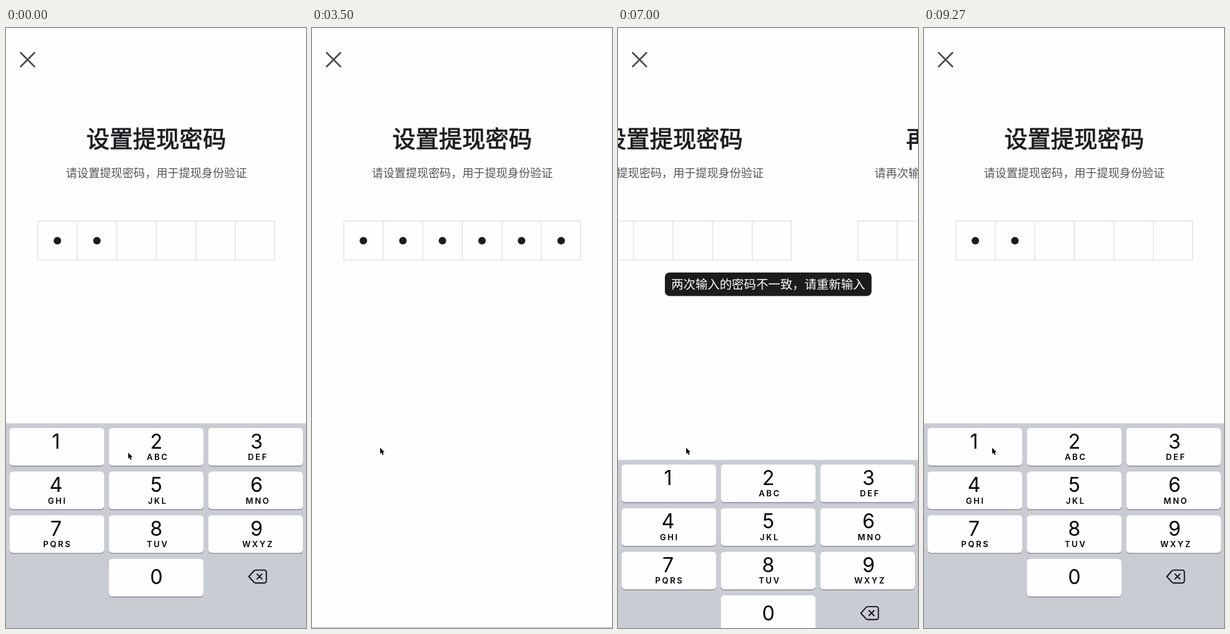
Animation of 480 by 957 pixels, one loop 9310 ms. Source, as an HTML page:

```html
<!DOCTYPE html>
<html lang="zh-CN">
<head>
<meta charset="utf-8">
<style>
html, body { margin: 0; width: 100%; height: 100%; overflow: hidden; background: #fefdff; }
svg { display: block; width: 480px; height: 957px; }
text { text-anchor: middle; font-family: "Noto Sans CJK SC", "Noto Sans CJK", sans-serif; }
.title { font-size: 37.3px; fill: #1d1b1e; stroke: #1d1b1e; stroke-width: .9px; }
.sub { font-size: 18.1px; fill: #555457; }
.digit { font: 32px Inter, sans-serif; }
.abc { font: 600 13px Inter, sans-serif; letter-spacing: 2.6px; }
.toast { font-size: 19.4px; fill: #fefdff; }
.line { fill: none; stroke: #e1e0e3; stroke-width: 1.4; }
.icon { fill: none; stroke: #111; stroke-width: 1.9; stroke-linejoin: round; stroke-linecap: round; }
</style>
</head>
<body>
<svg id="stage" viewBox="0 0 480 957"></svg>
<script>
const LOOP = 9310, GAP = 485;
const stage = document.getElementById('stage');
const $ = id => document.getElementById(id);
const cell = i => 82.2 + i * 63.28;

function page(id, title, sub) {
  let s = `<g id="${id}"><text class="title" x="240.3" y="191.3">${title}</text>
    <text class="sub" x="240.5" y="238.4">${sub}</text>
    <path class="line" d="M51 308H429.7V370.4H51Z`;
  for (let i = 1; i < 6; i++) s += `M${cell(i) - 31.6} 308v62.4`;
  s += '"/>';
  for (let i = 0; i < 6; i++) s += `<circle id="${id}${i}" cx="${cell(i)}" cy="339.2" fill="#1d1b1e"/>`;
  return s + '</g>';
}

function keyboard() {
  const letters = ['', 'ABC', 'DEF', 'GHI', 'JKL', 'MNO', 'PQRS', 'TUV', 'WXYZ'];
  const key = (col, row, digit, abc, dy) => {
    const x = 5.5 + col * 159, y = 638 + row * 69.6, cx = 80 + col * 160.5;
    return `<rect x="${x}" y="${y + 1.4}" width="151.5" height="60" rx="5.5" fill="#898b90"/>
      <rect id="key${digit}" x="${x}" y="${y}" width="151.5" height="60" rx="5.5" fill="#fefdff"/>
      <text class="digit" x="${cx}" y="${y + dy}">${digit}</text>
      <text class="abc" x="${cx + 2.4}" y="${y + 51}">${abc}</text>`;
  };
  return `<g id="keyboard"><rect y="630.5" width="480" height="327" fill="#c9ccd3"/>` +
    letters.map((abc, i) => key(i % 3, Math.floor(i / 3), i + 1, abc, 32.5)).join('') +
    key(1, 3, 0, '', 40) +
    `<path class="icon" d="M388.6 875L396.6 866Q398 864.6 400 864.6H413Q416.6 864.6 416.6 868.2V881.6Q416.6 885.2 413 885.2H400Q398 885.2 396.6 883.8ZM401.6 870.9l8 8m0-8l-8 8"/></g>`;
}

stage.innerHTML =
  page('first', '设置提现密码', '请设置提现密码，用于提现身份验证') +
  page('again', '再次输入密码', '请再次输入提现密码，验证密码是否正确') +
  `<path d="M23.5 39.5l22 22m0-22l-22 22" stroke="#4b4a4d" stroke-width="2.6" stroke-linecap="round"/>` +
  keyboard() +
  `<g id="toast"><rect x="75" width="330.7" height="37.4" rx="7" fill="#1d1b1e"/>
    <text class="toast" x="240.3" y="26">两次输入的密码不一致，请重新输入</text></g>
  <path id="cursor" d="M0 0V9.6L2.2 7.7 3.8 11.4 5.5 10.7 4 7.1 6.9 6.9Z" fill="#000" stroke="#fff" stroke-width=".9" paint-order="stroke"/>`;

const seg = (t, a, b) => Math.min(1, Math.max(0, (t - a) / (b - a)));
const smooth = p => p * p * (3 - 2 * p);
const out = p => 1 - (1 - p) ** 1.75;
const move = (id, x, y) => $(id).setAttribute('transform', `translate(${x} ${y})`);

// Start time of each dot; the first page is refilled before the loop ends.
const firstTaps = [-500, -180, 1690, 2390, 2820, 3260];
const againTaps = [4320, 4722, 5020, 5290, 5590, 5820];
const refill = [8820, 9122];
const RESET = 6813;

function dots(id, taps, t) {
  taps.forEach((tap, i) => $(id + i).setAttribute('r', 6 * out(seg(t, tap, tap + 130))));
}

function draw(now) {
  const t = now % LOOP, cleared = t >= RESET;
  dots('first', cleared ? firstTaps.map((_, i) => refill[i] ?? LOOP) : firstTaps, t);
  dots('again', cleared ? againTaps.map(() => LOOP) : againTaps, t);

  const slide = smooth(seg(t, 3500, 3800)) - smooth(seg(t, RESET, RESET + 300));
  move('first', -GAP * slide, 0);
  move('again', GAP * (1 - slide), 0);

  const hidden = smooth(seg(t, 3260, 3440)) - out(seg(t, 3500, 3800)) +
    smooth(seg(t, 5820, 5995)) - out(seg(t, RESET, RESET + 300));
  move('keyboard', 0, 327 * hidden);

  const press = Math.sin(Math.PI * seg(t, 1490, 1650));
  $('key1').setAttribute('fill', `rgb(${254 - 26 * press},${253 - 24 * press},${255 - 22 * press})`);

  const enter = out(seg(t, 5880, 6170));
  move('toast', 0, 390 + 26 * (1 - enter) - 114.7 * smooth(seg(t, 7160, 7370)));
  $('toast').setAttribute('opacity', enter * (1 - seg(t, 7880, 8130)));

  const glide = smooth(seg(t, 10, 430));
  move('cursor', 195.5 - 86.4 * glide, 677.3 - 7.7 * glide);
  requestAnimationFrame(frame);
}

function frame() { draw(performance.now()); }
draw(0);
</script>
</body>
</html>
```
